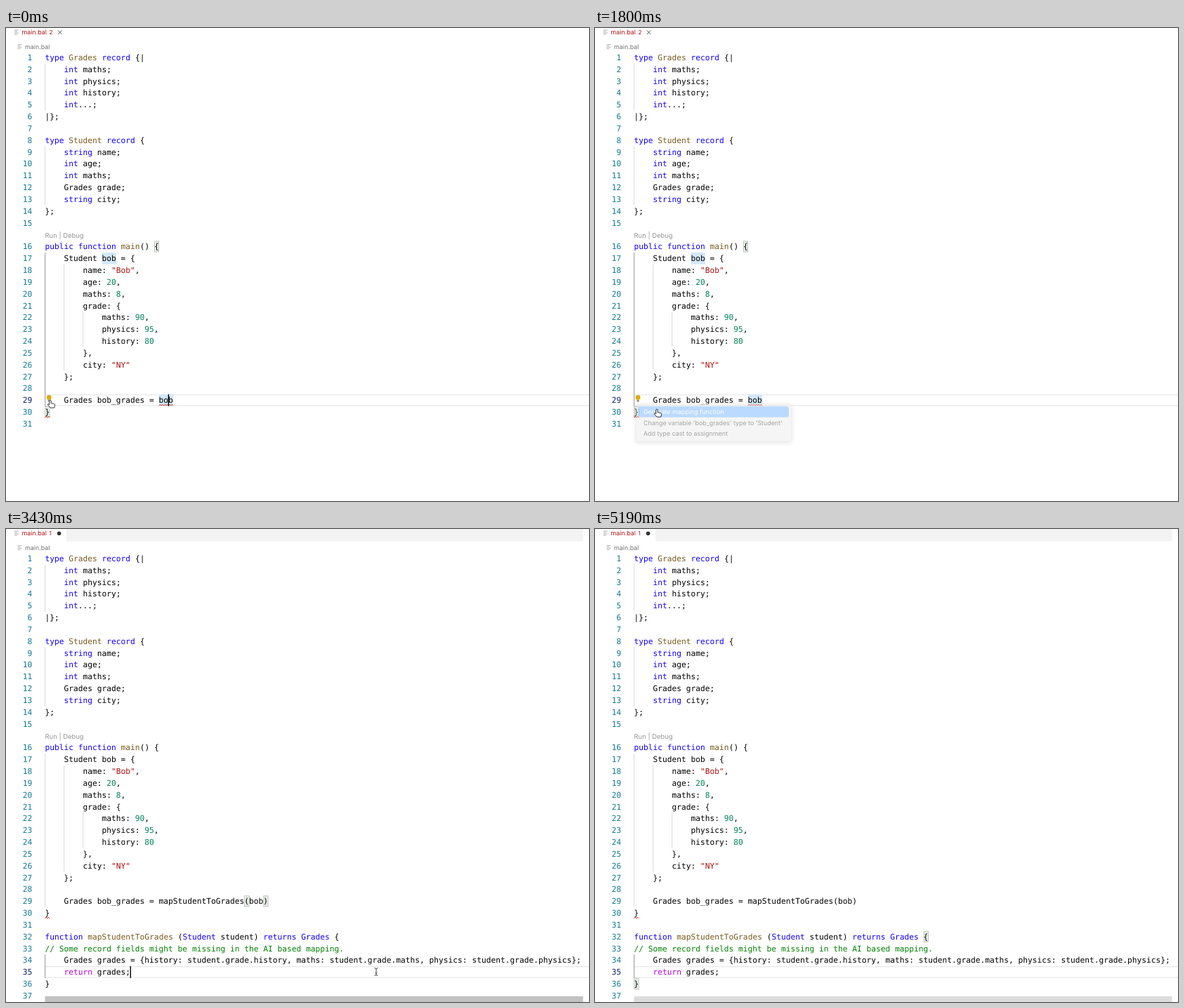
These frames come from a looping animation (830x674 px, 5290 ms). An HTML page:

```html
<!DOCTYPE html>
<html lang="en">
<head>
<meta charset="utf-8">
<title>Editor quick fix</title>
<style>
  html, body { margin: 0; width: 100%; height: 100%; overflow: hidden; background: #fff; }
  svg { display: block; }
  text { font: 8.9px Inter, "Open Sans", sans-serif; text-rendering: geometricPrecision; white-space: pre; }
  .code { font: 11.23px "DejaVu Sans Mono", "Liberation Mono", monospace; }
  .key { fill: #1200f8; }
  .fn { fill: #7a5a1d; }
  .str { fill: #b01011; }
  .num { fill: #008558; }
  .note { fill: #008000; }
  .flow { fill: #b800d9; }
  .menu { filter: drop-shadow(0 2px 3px rgba(0, 0, 0, .27)); }
</style>
</head>
<body>
<svg id="stage" width="830" height="674"></svg>
<script>
const LOOP = 5290, LEFT = 55.5, COL = 6.76, ROW = 16.84;
const svg = document.getElementById('stage');

// Moments at which the picture may change
const ticks = [0, 150, 300, 450, 900, 1050, 1500, 1800, 1950, 2100, 2400, 2550, 2700, 2850, 3000,
  3150, 3300, 3430, 3580, 4030, 4180, 4330, 4460, 4610, 4760, 4900, 5190];
const INSERT = 2100, CLICK = 3430, REMATCH = 3580;
const blinks = [0, 450, 900, 1500, 2100, 2700, 3150, 4030, 4460, 4900];

const code = `type Grades record {|
    int maths;
    int physics;
    int history;
    int...;
|};

type Student record {
    string name;
    int age;
    int maths;
    Grades grade;
    string city;
};

public function main() {
    Student bob = {
        name: "Bob",
        age: 20,
        maths: 8,
        grade: {
            maths: 90,
            physics: 95,
            history: 80
        },
        city: "NY"
    };

    Grades bob_grades = bob
}
`.split('\n');

const added = `
function mapStudentToGrades (Student student) returns Grades {
// Some record fields might be missing in the AI based mapping.
    Grades grades = {history: student.grade.history, maths: student.grade.maths, physics: student.grade.physics};
    return grades;
}
`.split('\n');

const mapped = [...code.slice(0, 28), '    Grades bob_grades = mapStudentToGrades(bob)', '}', ...added];

const tokens = new RegExp([
  '(?<note>//.*)',
  '(?<str>".*?")',
  '(?<fn>(?<=(?:type|function) )\\w+)',
  '(?<key>\\b(?:type|record|int|string|public|function|returns)\\b|(?<=\\(|returns )[A-Z]\\w+)',
  '(?<flow>\\breturn\\b)',
  '(?<num>\\d+)'
].join('|'), 'g');

function colour(line) {
  return line.replace(tokens, (word, ...rest) => {
    const groups = rest.at(-1);
    const kind = Object.keys(groups).find(k => groups[k]);
    return `<tspan class="${kind}">${word}</tspan>`;
  });
}

// Line 16 and below sit one row lower, under the "Run | Debug" lens
const rowY = n => 33.6 + ROW * (n > 15 ? n : n - 1);
const colX = col => LEFT + COL * col;

const rect = (x, y, w, h, fill, more = '') =>
  `<rect x="${x}" y="${y}" width="${w}" height="${h}" fill="${fill}" ${more}/>`;
const text = (x, y, str, fill = '#000', more = '') =>
  `<text x="${x}" y="${y}" fill="${fill}" ${more}>${str}</text>`;
const path = (d, stroke, width = 1, fill = 'none') =>
  `<path d="${d}" stroke="${stroke}" stroke-width="${width}" fill="${fill}"/>`;

const guide = (col, from, to, active) =>
  rect(colX(col) - .3, rowY(from), 1, rowY(to) + ROW - rowY(from), active ? '#939393' : '#d9d9d9');
const bracket = (n, col) =>
  rect(colX(col) + .3, rowY(n) + .8, COL - .4, ROW - 1.6, '#e6f0e6', 'stroke="#b9b9b9" stroke-width=".8"');
const mark = (n, col) => rect(colX(col), rowY(n), COL * 3, ROW, '#d3e8f9');
const squiggle = (n, col, waves) =>
  path(`M${colX(col)} ${rowY(n) + 16.2}` + 'l1.7-1.8 1.7 1.8'.repeat(waves), '#e51400', .9);
const listIcon = (x, y) => path(`M${x} ${y - 3}h6m-6 2h4m-4 2h6m-6 2h4`, '#a0a0a0', .8);

function tabs(done) {
  return (done ? rect(86, 0, 735.5, 17.5, '#f3f3f3') : '') +
    listIcon(12, 6) + text(22.5, 9.3, 'main.bal', '#b01011') +
    text(61.5, 9.1, done ? 1 : 2, '#b01011', 'style="font-size:8.3px"') +
    (done ? '<circle cx="75.6" cy="6.2" r="2.8" fill="#333"/>'
          : path('M73.8 3.4l5.6 5.6m0-5.6l-5.6 5.6', '#444', .9)) +
    listIcon(16.5, 26.5) + text(27, 29.6, 'main.bal', '#707070') +
    text(LEFT, 298.6, 'Run | Debug', '#949494', 'style="font-size:9.45px"');
}

function backdrop(t, done, line) {
  const edge = y => rect(LEFT, y, 774.5, 1.3, '#e9e9e9');
  let out = edge(rowY(line)) + edge(rowY(line) + ROW - 1.3);
  if (!done) out += mark(17, 12) + mark(29, 24) + bracket(16, 23) + bracket(30, 0);
  else if (t < REMATCH) out += bracket(29, 42) + bracket(29, 46);
  else out += bracket(32, 61) + bracket(36, 0);
  out += guide(0, 2, 5) + guide(0, 9, 13) + guide(0, 17, 29, line === 29) +
    guide(4, 18, 26) + guide(8, 22, 24);
  return done ? out + guide(0, 34, 35, line === 35) : out;
}

function listing(lines, current) {
  return lines.map((line, i) => {
    const n = i + 1, y = rowY(n) + 12.3;
    return text(37.3, y, n, n === current ? '#0b216f' : '#127a94', 'class="code" text-anchor="end"') +
      (line && text(LEFT, y, colour(line), '#000', 'class="code"'));
  }).join('');
}

function bulb() {
  return '<circle cx="61.2" cy="526.4" r="3.4" fill="#dfab0c"/>' +
    rect(59.7, 528.6, 3, 1.6, '#dfab0c') + rect(59.7, 530.6, 3, 1.6, '#555');
}

function popup(t) {
  const items = ['Generate mapping function', "Change variable 'bob_grades' type to 'Student'", 'Add type cast to assignment'];
  const chosen = t >= 1050;
  return `<g opacity="${t >= 1800 ? .38 : 1}">` +
    rect(58, 535.3, 222, 54, '#e8e6e7', 'rx="4.5" class="menu" stroke="#c6c6c6" stroke-width=".5"') +
    (chosen ? rect(62, 539.3, 214, 15.4, '#4fa0ff', 'rx="3"') : '') +
    items.map((s, i) => text(69, 550.4 + 15.5 * i, s, chosen && !i ? '#fff' : '#111')).join('') + '</g>';
}

// Hot spot of the mouse: [time, x, y]
const track = [[0, 63, 530], [450, 88, 543], [2250, 88, 543], [CLICK, 527, 631],
  [3880, 527, 631], [4610, 772, 663], [4760, 773, 670], [4900, 774, 690], [LOOP, 774, 690]];

function mouse(t) {
  const i = track.findIndex(p => p[0] > t);
  const [t0, x0, y0] = track[i - 1], [t1, x1, y1] = track[i];
  const u = (t - t0) / (t1 - t0), e = u * u * (3 - 2 * u);
  let shape;
  if (t < 150 || t === 1800)
    shape = path('M-1.2 1Q0-1.2 1.2 1V4.6l3.8 .8q1.9 .4 1.6 2.4l-.8 3.4H0L-3.2 7.2q-.8-1.8 .8-1.5l1.2 1.2Z', '#222', .9, '#fff');
  else if (t < 1800)
    shape = path('M0-1.5V8L2.2 6.2 3.8 9.6 5.4 8.9 3.9 5.7H6.8Z', '#fff', .7, '#000');
  else
    shape = path('M-2.5-5.3Q0-5.3 0-4V4Q0 5.3-2.5 5.3M2.5-5.3Q0-5.3 0-4M0 4Q0 5.3 2.5 5.3M-1.4 1.7H1.4', '#333', .9);
  return `<g transform="translate(${x0 + (x1 - x0) * e} ${y0 + (y1 - y0) * e})">${shape}</g>`;
}

function caret(t, done, line) {
  if (blinks.filter(b => b <= t).length % 2 === 0) return '';
  const col = line === 35 ? 18 : done ? 45 : 26;
  return rect(colX(col) - .6, rowY(line), 1.4, ROW, '#000');
}

function slider(t) {
  const fill = t >= 5190 ? '#dcdcdc' : t === 4760 ? '#929292' : '#c1c1c1';
  return rect(LEFT, 665.8, 766, 8.2, fill);
}

function scene(t) {
  const done = t >= INSERT, line = t >= CLICK ? 35 : 29;
  return tabs(done) + backdrop(t, done, line) + listing(done ? mapped : code, line) +
    squiggle(30, 0, 2) + (done ? slider(t) : squiggle(29, 24, 6) + bulb()) +
    caret(t, done, line) + (t >= 150 && t < 1950 ? popup(t) : '') + mouse(t);
}

let shown = -1;
function draw() {
  const now = performance.now() % LOOP;
  const t = ticks.findLast(x => x <= now);
  if (t !== shown) svg.innerHTML = scene(shown = t);
  requestAnimationFrame(draw);
}
draw();
</script>
</body>
</html>
```
